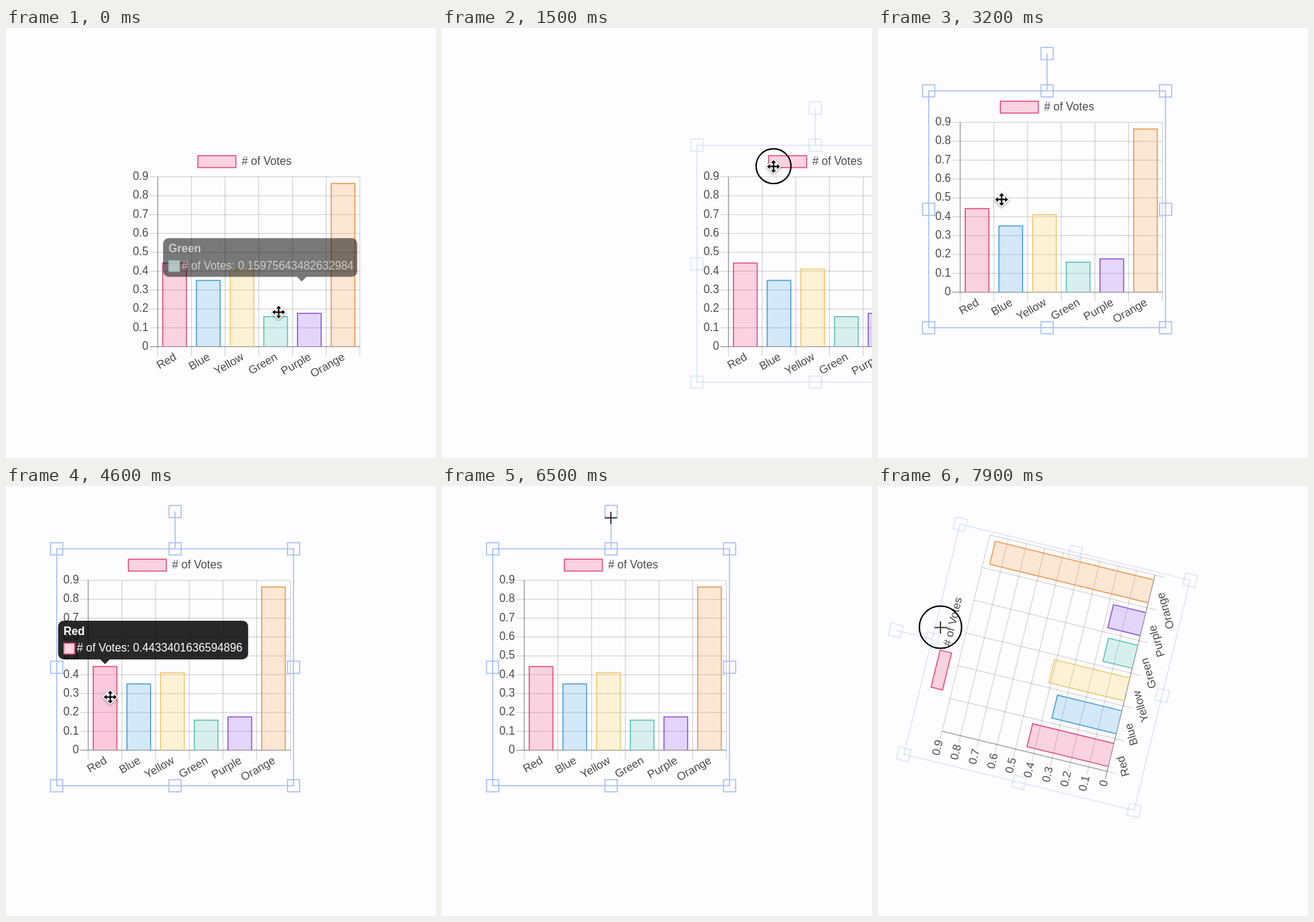
These frames come from a looping animation (600 px wide and 600 px high, 8000 ms). An HTML page with a canvas:

```html
<!DOCTYPE html>
<html lang="en">
<head>
<meta charset="utf-8">
<title>Draggable bar chart</title>
<style>
html, body { margin: 0; width: 100%; height: 100%; overflow: hidden; background: #fdfcfe; }
canvas { display: block; width: 600px; height: 600px; }
</style>
</head>
<body>
<canvas id="stage" width="600" height="600"></canvas>
<script>
const ctx = document.getElementById('stage').getContext('2d');
const LOOP = 8000, STEP = 100, SIZE = 330.5, MID = SIZE / 2;
const LEFT = 44, TOP = 44, BASE = 281, RIGHT = 326, CATEGORY = 47, UNIT = (BASE - TOP) / 0.9;
const FONT = '"Liberation Sans", Arial, sans-serif';
const TIP_HEIGHT = 54, FADE = 400;
const HOME = [167, 163], REST = [70, 87];
const SELECT = 400, DRAG = 700, SWING = 1500, SETTLE = 2500, RELEASE = 2700, ROTATE = 6700, END = 7900;

const bars = [
  { name: 'Red', value: '0.4433401636594896', rgb: '240,60,120', edge: '#e0507f' },
  { name: 'Blue', value: '0.3511830274615938', rgb: '60,160,225', edge: '#4e9fd3' },
  { name: 'Yellow', value: '0.4110582937461205', rgb: '250,205,75', edge: '#f0ca70' },
  { name: 'Green', value: '0.15975643482632984', rgb: '80,195,180', edge: '#5fc4b3' },
  { name: 'Purple', value: '0.17646615782545072', rgb: '135,75,240', edge: '#8c58d8' },
  { name: 'Orange', value: '0.8642917305846213', rgb: '245,150,65', edge: '#e89a50' }
];

// Stops of the free cursor: time, x, y.
const stops = [
  [RELEASE, 281, 214], [3400, 145, 245], [3600, 137, 300], [3900, 372, 350], [4300, 145, 294],
  [5000, 145, 294], [5400, 330, 335], [5700, 349, 323], [6200, 412, 150], [6500, 235, 44], [ROTATE, 235, 44]
];

const clamp = (v, lo, hi) => Math.max(lo, Math.min(hi, v));
const ramp = (t, a, b) => clamp((t - a) / (b - a), 0, 1);
const mix = (a, b, k) => a + (b - a) * k;
const mixPoint = (a, b, k) => a.map((v, i) => mix(v, b[i], k));
const smooth = k => k * k * (3 - 2 * k);
const easeOut = (k, power) => 1 - (1 - k) ** power;
const radians = degrees => degrees * Math.PI / 180;

// The chart is swung in a counterclockwise ellipse that grows, then settles.
function boxAt(t) {
  const settle = ramp(t, SWING, SETTLE);
  const [x, y] = mixPoint(HOME, REST, easeOut(settle, 2));
  const reach = ramp(t, DRAG, SWING) ** 2 * (1 - settle ** 1.234);
  const phase = radians(0.81 * (t - SWING));
  return [x + 188 * reach * Math.cos(phase), y - 88 * reach * Math.sin(phase)];
}

const turnAt = t => easeOut(ramp(t, ROTATE, END), 1.5);

function cursorAt(t) {
  if (t < DRAG) return mixPoint([380, 396], [191, 115], smooth(ramp(t, 0, 500)));
  if (t < RELEASE) {
    const grab = mixPoint([24, -48], [211, 127], ramp(t, DRAG, SETTLE));
    return boxAt(t).map((v, i) => v + grab[i]);
  }
  if (t < ROTATE) {
    const next = stops.findIndex(stop => stop[0] > t);
    const [from, to] = [stops[next - 1], stops[next]];
    return mixPoint(from.slice(1), to.slice(1), smooth(ramp(t, from[0], to[0])));
  }
  const turn = turnAt(t), radius = mix(208.5, 158.5, turn), angle = radians(mix(270, 200.4, turn));
  return [REST[0] + MID + radius * Math.cos(angle), REST[1] + MID + radius * Math.sin(angle)];
}

const barTop = i => BASE - bars[i].value * UNIT;
const barLeft = i => LEFT + i * CATEGORY + 7;

function hoveredBar(t) {
  if (t >= ROTATE) return -1;
  const [x, y] = cursorAt(t).map((v, i) => v - REST[i]);
  return bars.findIndex((_, i) => x > barLeft(i) && x < barLeft(i) + 33 && y > barTop(i) && y < BASE);
}

function line(points, color, width = 1.3) {
  ctx.beginPath();
  points.forEach(([x, y]) => ctx.lineTo(x, y));
  ctx.strokeStyle = color;
  ctx.lineWidth = width;
  ctx.stroke();
}

function label(text, x, y, color = '#4c4a4e', align = 'left', weight = '') {
  ctx.font = `${weight} 15.7px ${FONT}`;
  ctx.textAlign = align;
  ctx.textBaseline = 'middle';
  ctx.fillStyle = color;
  ctx.fillText(text, x, y);
}

function swatch(x, y, w, h, bar) {
  ctx.fillStyle = `rgba(${bar.rgb},.22)`;
  ctx.fillRect(x, y, w, h);
  ctx.strokeStyle = bar.edge;
  ctx.lineWidth = 1.5;
  ctx.strokeRect(x, y, w, h);
}

function drawChart(active) {
  swatch(100, 14.5, 53, 16.5, bars[0]);
  label('# of Votes', 161, 23);
  const grid = first => first ? 'rgba(0,0,0,.38)' : 'rgba(0,0,0,.15)';
  for (let i = 0; i < 10; i++) {
    const y = BASE - i * UNIT / 10;
    line([[LEFT - 11, y], [RIGHT, y]], grid(!i));
    label(i ? (i / 10).toFixed(1) : '0', 31, y, undefined, 'right');
  }
  for (let i = 0; i <= bars.length; i++) {
    const x = LEFT + i * CATEGORY;
    line([[x, TOP], [x, BASE]], grid(!i));
    line([[x, BASE], [x, BASE + 13]], grid(false));
  }
  bars.forEach((bar, i) => {
    const x = barLeft(i), y = barTop(i);
    ctx.fillStyle = `rgba(${bar.rgb},${i === active ? 0.26 : 0.22})`;
    ctx.fillRect(x, y, 33, BASE - y);
    line([[x, BASE], [x, y], [x + 33, y], [x + 33, BASE]], bar.edge, 1.5);
    ctx.save();
    ctx.translate(x + 18, BASE + 13.5);
    ctx.rotate(-Math.PI / 6);
    label(bar.name, 0, 0, undefined, 'right');
    ctx.restore();
  });
}

function tipPlace(i) {
  ctx.font = `15.7px ${FONT}`;
  const w = ctx.measureText('# of Votes: ' + bars[i].value).width + 34;
  const caret = LEFT + (i + 0.5) * CATEGORY;
  return { x: clamp(caret - w / 2, 2, 329 - w), y: barTop(i) - 10 - TIP_HEIGHT, caret, w };
}

function tween({ from, goal, since }, t) {
  const k = easeOut(ramp(t, since, since + 300), 4), place = {};
  for (const key in goal) place[key] = mix(from[key], goal[key], k);
  return place;
}

// Replays the hovers so far, so the tooltip depends on the time alone.
function tooltipAt(t) {
  const first = { x: 51.5, y: 129.5, caret: 245, w: 271 };
  let tip = { bar: 3, from: first, goal: first, since: 0, hidden: -210 };
  for (let s = RELEASE; s <= t; s += STEP) {
    const hit = hoveredBar(s), shown = tip.hidden === Infinity;
    if (hit < 0) {
      if (shown) tip.hidden = s;
    } else if (!shown || hit !== tip.bar) {
      const goal = tipPlace(hit);
      const from = shown || s - tip.hidden < FADE ? tween(tip, s) : goal;
      tip = { bar: hit, from, goal, since: s, hidden: Infinity };
    }
  }
  const alpha = 1 - ramp(t, tip.hidden, tip.hidden + FADE) ** 1.5 || 0;
  return { ...tween(tip, t), bar: tip.bar, alpha: tip.hidden === Infinity ? 1 : alpha };
}

function drawTooltip({ x, y, w, caret, bar, alpha }) {
  if (!alpha) return;
  const item = bars[bar], bottom = y + TIP_HEIGHT;
  ctx.save();
  ctx.beginPath();
  ctx.rect(0, 0, SIZE, SIZE);
  ctx.clip();
  ctx.globalAlpha = alpha;
  ctx.fillStyle = 'rgba(0,0,0,.84)';
  ctx.beginPath();
  ctx.roundRect(x, y, w, TIP_HEIGHT, 8);
  ctx.moveTo(caret - 6.6, bottom);
  ctx.lineTo(caret + 6.6, bottom);
  ctx.lineTo(caret, bottom + 6.6);
  ctx.fill();
  label(item.name, x + 7.5, y + 15.5, '#fff', 'left', 'bold');
  ctx.fillStyle = '#fff';
  ctx.fillRect(x + 7.5, y + 31, 16, 16);
  swatch(x + 8, y + 31.5, 15, 15, item);
  label('# of Votes: ' + item.value, x + 26, y + 39, '#fff');
  ctx.restore();
}

function drawSelection(alpha) {
  const color = '#a6c1f1';
  ctx.globalAlpha = alpha;
  line([[MID, 0], [MID, -52]], color, 1.5);
  ctx.strokeRect(0, 0, SIZE, SIZE);
  const handle = (x, y) => ctx.strokeRect(x - 8.5, y - 8.5, 17, 17);
  for (const x of [0, MID, SIZE])
    for (const y of [0, MID, SIZE])
      if (x !== MID || y !== MID) handle(x, y);
  handle(MID, -52);
  ctx.globalAlpha = 1;
}

function polygon(points) {
  ctx.beginPath();
  points.forEach(([x, y]) => ctx.lineTo(x, y));
  ctx.closePath();
  ctx.fill();
}

function drawMoveCursor() {
  ctx.fillStyle = '#fff';
  ctx.shadowColor = 'rgba(0,0,0,.4)';
  ctx.shadowBlur = 3;
  ctx.shadowOffsetY = 1;
  polygon([[0, -11], [11, 0], [0, 11], [-11, 0]]);
  ctx.shadowColor = 'transparent';
  ctx.fillStyle = '#000';
  for (let i = 0; i < 4; i++) {
    polygon([[-1, 0], [-1, -5], [-3.6, -5], [0, -9], [3.6, -5], [1, -5], [1, 0]]);
    ctx.rotate(Math.PI / 2);
  }
}

function drawArrowCursor() {
  ctx.fillStyle = '#000';
  polygon([[0, 0], [0, 16], [4, 12.5], [6.5, 18], [9, 17], [6.5, 11.5], [11.5, 11.5]]);
  ctx.strokeStyle = '#fff';
  ctx.lineWidth = 1.2;
  ctx.stroke();
}

function drawCursor(t) {
  const [x, y] = cursorAt(t);
  const pressed = (t >= SELECT && t < RELEASE) || t >= ROTATE - STEP;
  const outside = t >= RELEASE && (x > REST[0] + SIZE + 8 || y < REST[1] - 8);
  ctx.save();
  ctx.translate(x + 0.5, y + 0.5);
  if (pressed) {
    ctx.beginPath();
    ctx.arc(0, -0.5, 24.3 + 5.2 * ramp(t, END - 200, END), 0, Math.PI * 2);
    ctx.strokeStyle = '#000';
    ctx.lineWidth = 2;
    ctx.stroke();
  }
  if (t >= 6400) {
    line([[-8.5, 0], [8.5, 0]], '#222', 1.6);
    line([[0, -8.5], [0, 8.5]], '#222', 1.6);
  } else if (outside) drawArrowCursor();
  else drawMoveCursor();
  ctx.restore();
}

function draw(t) {
  const [x, y] = boxAt(t);
  const tip = tooltipAt(t);
  const moving = (t >= DRAG && t < RELEASE) || t >= ROTATE;
  ctx.fillStyle = '#fdfcfe';
  ctx.fillRect(0, 0, 600, 600);
  ctx.save();
  ctx.beginPath();
  ctx.rect(4, 0, 596, 600);
  ctx.clip();
  ctx.translate(x + MID + 0.7, y + MID + 0.7);
  ctx.rotate(radians(-76.3 * turnAt(t)));
  ctx.translate(-MID, -MID);
  drawChart(tip.alpha === 1 ? tip.bar : -1);
  drawTooltip(tip);
  if (t >= SELECT) drawSelection(moving ? 0.37 : 1);
  ctx.restore();
  drawCursor(t);
}

const start = performance.now();
function tick(now) {
  const t = Math.max(0, now - start) % LOOP;
  draw(Math.floor(t / STEP) * STEP);
  requestAnimationFrame(tick);
}
draw(0);
requestAnimationFrame(tick);
</script>
</body>
</html>
```
